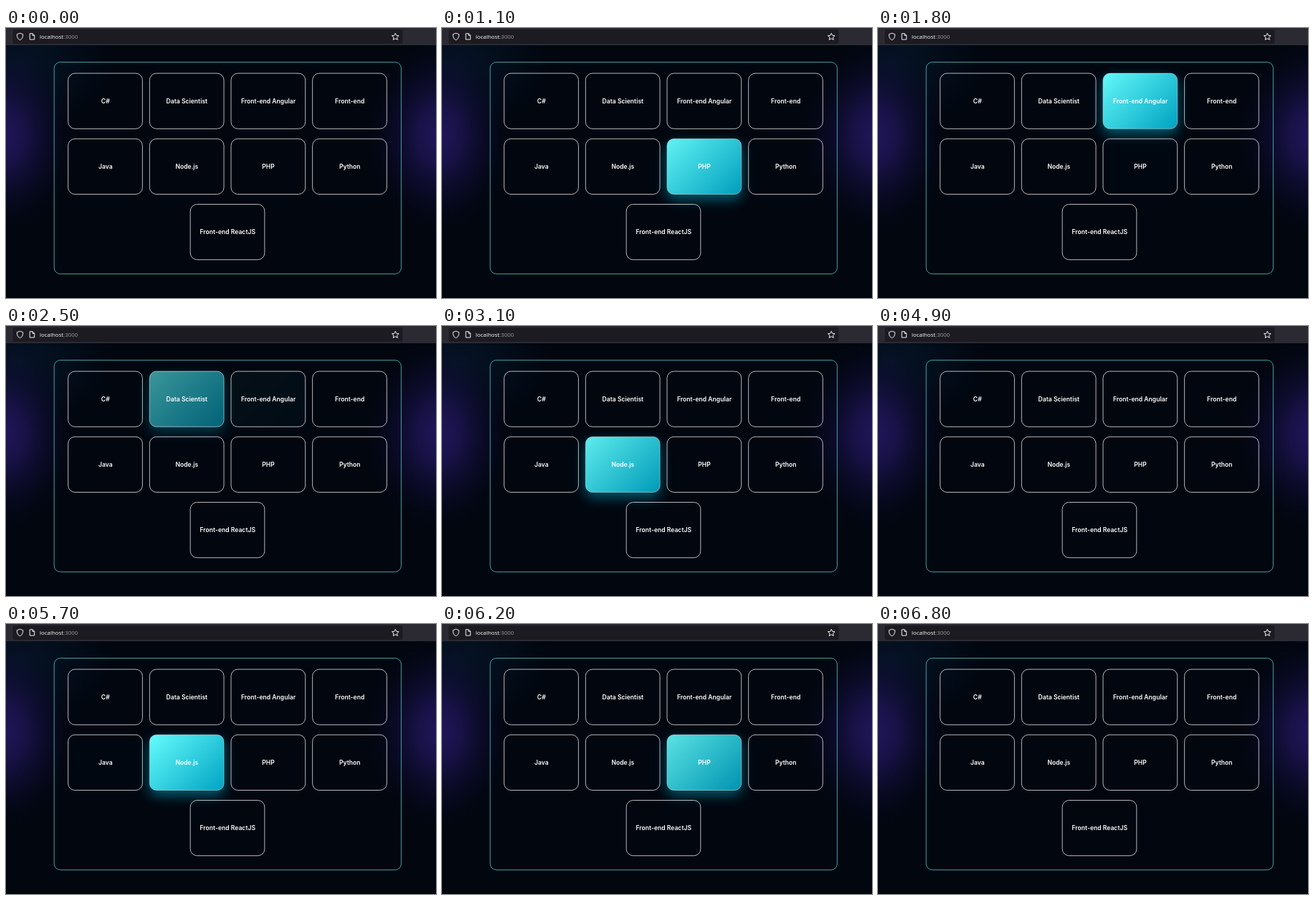
Write an HTML page that moves like this. It is 600x376 px and loops after 8 s.

```html
<!DOCTYPE html>
<html lang="en">
<head>
<meta charset="utf-8">
<title>Technology cards</title>
<style>
  html, body { margin: 0; width: 100%; height: 100%; overflow: hidden; background: #01060f; }
  svg { display: block; width: 600px; height: 376px; }
  .url { font: 7.9px "Open Sans", sans-serif; fill: #fbfbfe; }
  .label { font: 600 8.6px Inter, sans-serif; fill: #fff; text-anchor: middle; }
  .icon { fill: none; stroke: #f0f0f4; stroke-width: 1; stroke-linejoin: round; }
</style>
</head>
<body>
<svg viewBox="0 0 600 376">
  <defs>
    <radialGradient id="purple">
      <stop offset="0" stop-color="#21165c"/>
      <stop offset=".3" stop-color="#1b134d" stop-opacity=".9"/>
      <stop offset=".65" stop-color="#100d36" stop-opacity=".5"/>
      <stop offset="1" stop-color="#060a1c" stop-opacity="0"/>
    </radialGradient>
    <radialGradient id="blue">
      <stop offset="0" stop-color="#06182c" stop-opacity=".8"/>
      <stop offset="1" stop-color="#06182c" stop-opacity="0"/>
    </radialGradient>
    <linearGradient id="cyan" gradientUnits="userSpaceOnUse" x1="6.6" y1="-6.6" x2="97.4" y2="84.1">
      <stop offset="0" stop-color="#6ff"/>
      <stop offset="1" stop-color="#00a6c6"/>
    </linearGradient>
    <filter id="blur" x="-50%" y="-50%" width="200%" height="200%">
      <feGaussianBlur stdDeviation="9"/>
    </filter>
  </defs>

  <rect width="600" height="376" fill="#01060f"/>
  <ellipse cx="20" cy="50" rx="130" ry="90" fill="url(#blue)"/>
  <ellipse cx="-4" cy="150" rx="102" ry="135" fill="url(#purple)"/>
  <ellipse cx="606" cy="150" rx="105" ry="135" fill="url(#purple)"/>

  <rect width="600" height="24" fill="#2b2a33"/>
  <rect x="9.5" y="2" width="544" height="20" rx="3" fill="#1c1b22"/>
  <g class="icon">
    <path d="M19.5 7.2 L23.6 8.7 V11.2 Q23.4 15 19.5 16.8 Q15.6 15 15.4 11.2 V8.7 Z"/>
    <path d="M33.2 7.7 H37.2 L39.7 10.2 V16 H33.2 Z M37 7.9 V10.4 H39.5"/>
    <path id="star"/>
  </g>
  <text class="url" x="47" y="15.3">localhost<tspan fill="#9b9ba3">:3000</tspan></text>

  <rect x="67.2" y="47.6" width="484.2" height="294.8" rx="8.5" fill="none" stroke="#48b5b5" stroke-width=".9"/>
  <g id="cards"></g>
</svg>
<script>
const LOOP = 8000, STEP = 100, FADE = 300;
const CARD = { w: 103.7, h: 77.2, left: 86.7, top: 63.1, dx: 113.65, dy: 91.2 };

// Each hover is [enter, leave] in milliseconds.
const cards = [
  { name: "C#", col: 0, row: 0 },
  { name: "Data Scientist", col: 1, row: 0, hovers: [[2400, 2720]] },
  { name: "Front-end Angular", col: 2, row: 0, hovers: [[1560, 2270]] },
  { name: "Front-end", col: 3, row: 0 },
  { name: "Java", col: 0, row: 1, hovers: [[4910, 5420]] },
  { name: "Node.js", col: 1, row: 1, hovers: [[2900, 3370], [5440, 5850]] },
  { name: "PHP", col: 2, row: 1, hovers: [[880, 1530], [6020, 6450]] },
  { name: "Python", col: 3, row: 1 },
  { name: "Front-end ReactJS", col: 1.5, row: 2, hovers: [[3820, 4560]] }
];

function add(parent, tag, attrs, text = "") {
  const node = document.createElementNS(parent.namespaceURI, tag);
  for (const key in attrs) node.setAttribute(key, attrs[key]);
  node.textContent = text;
  return parent.appendChild(node);
}

function buildCard(card) {
  const { w, h, left, top, dx, dy } = CARD;
  const box = { width: w, height: h, rx: 9.5 };
  const group = add(document.getElementById("cards"), "g", {
    transform: `translate(${left + card.col * dx} ${top + card.row * dy})`
  });
  card.light = add(group, "g", { opacity: 0 });
  add(card.light, "rect", { ...box, y: 7, fill: "#00c4e4", "fill-opacity": .5, filter: "url(#blur)" });
  add(card.light, "rect", { ...box, fill: "url(#cyan)" });
  card.border = add(group, "rect", { ...box, fill: "none", stroke: "#e4e6ea", "stroke-width": .8 });
  add(group, "text", { class: "label", x: w / 2 + .2, y: h / 2 + 3 }, card.name);
}

// The CSS "ease" curve, cubic-bezier(.25, .1, .25, 1).
function ease(x) {
  if (x <= 0) return 0;
  if (x >= 1) return 1;
  const bezier = (u, a, b) => 3 * u * (1 - u) ** 2 * a + 3 * u * u * (1 - u) * b + u ** 3;
  let low = 0, high = 1;
  for (let i = 0; i < 20; i++) {
    const mid = (low + high) / 2;
    if (bezier(mid, .25, .25) < x) low = mid; else high = mid;
  }
  return bezier(low, .1, 1);
}

function draw(time) {
  for (const { hovers = [], light, border } of cards) {
    let glow = 0;
    for (const [enter, leave] of hovers)
      glow += ease((time - enter) / FADE) - ease((time - leave) / FADE);
    light.setAttribute("opacity", glow);
    border.setAttribute("stroke-opacity", 1 - .4 * glow);
  }
}

const starPoints = Array.from({ length: 10 }, (_, i) => {
  const radius = i % 2 ? 2.4 : 5.1, angle = (i / 5 - .5) * Math.PI;
  return `${543.3 + radius * Math.cos(angle)} ${12.3 + radius * Math.sin(angle)}`;
});
document.getElementById("star").setAttribute("d", `M${starPoints.join("L")}Z`);
cards.forEach(buildCard);

const start = performance.now();
function tick() {
  const time = (performance.now() - start) % LOOP;
  draw(Math.floor(time / STEP) * STEP);
  requestAnimationFrame(tick);
}
tick();
</script>
</body>
</html>
```
